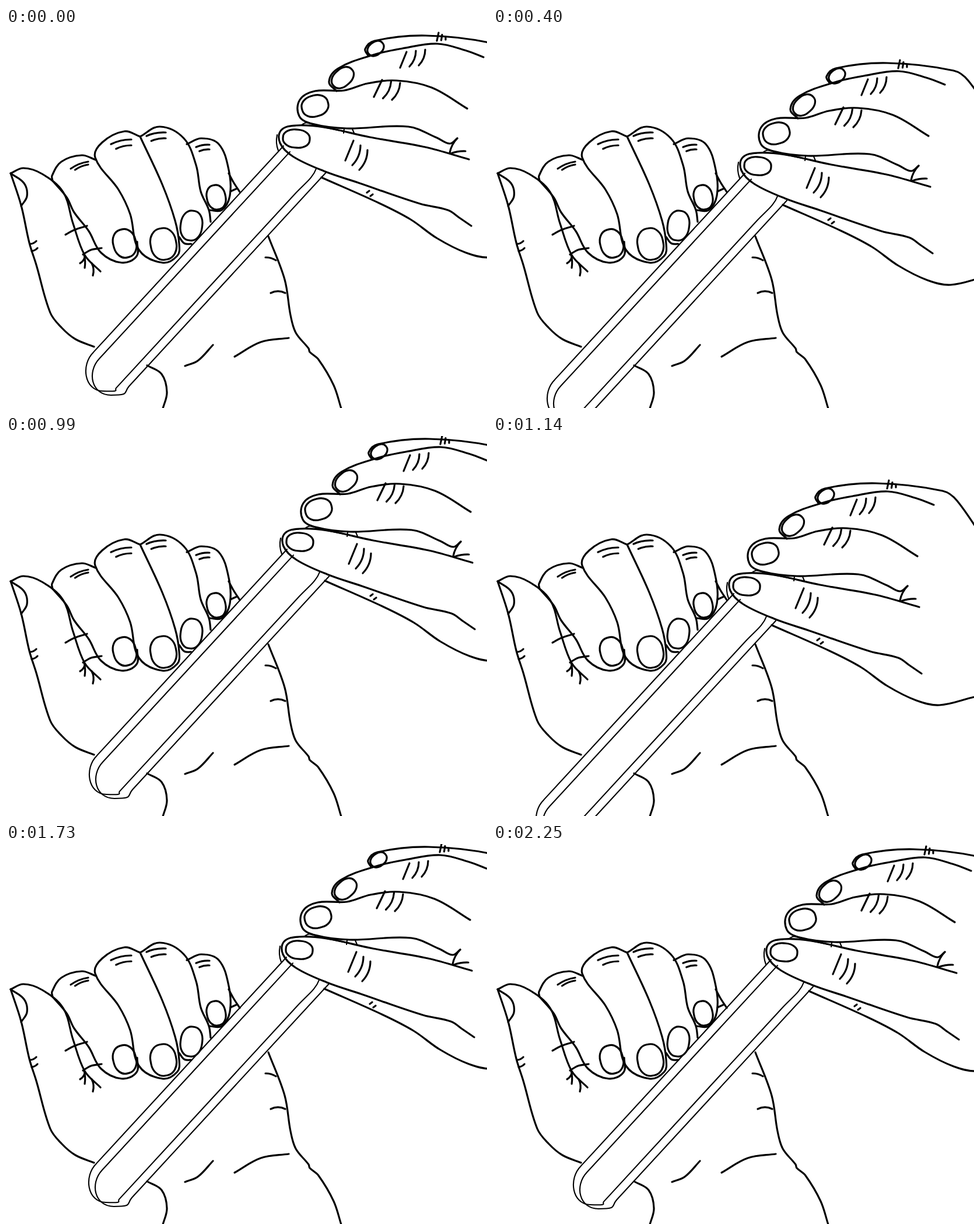
An HTML page for the animation above (2.58 s loop, 825 by 651 pixels).

```html
<!DOCTYPE html>
<html lang="en">
<head>
<meta charset="utf-8">
<title>Filing nails</title>
<style>
  html, body { margin: 0; width: 100%; height: 100%; overflow: hidden; background: #fff; }
  svg { display: block; width: 825px; height: 651px; }
  g { fill: none; stroke: #000; stroke-width: 3.2; stroke-linecap: round; stroke-linejoin: round; }
  #file { stroke-width: 2.1; }
</style>
</head>
<body>
<svg viewBox="0 0 825 651">
  <g id="resting"></g>
  <g id="moving"><g id="file"></g><g id="filing"></g></g>
</svg>
<script>
function pen(id) {
  const group = document.getElementById(id);
  const add = (tag, attributes) => {
    const shape = document.createElementNS(group.namespaceURI, tag);
    for (const name in attributes) shape.setAttribute(name, attributes[name]);
    group.append(shape);
  };
  const path = d => add("path", { d });

  // A bowed stroke from x, y that runs by dx, dy.
  const arc = (x, y, dx, dy, bow = 0) =>
    path(`M${x} ${y}q${dx / 2 + bow * dy} ${dy / 2 - bow * dx} ${dx} ${dy}`);

  // A nail is a rounded box around its centre.
  const nail = (x, y, rx, ry, tilt) => add("rect", {
    x: x - rx, y: y - ry, width: 2 * rx, height: 2 * ry,
    rx: rx * 0.9, ry: ry * 0.9, transform: `rotate(${tilt} ${x} ${y})`
  });

  // A smooth line: each point's tangent is parallel to its neighbours' chord.
  const curve = text => {
    const points = text.split(" ").map(p => p.split(",").map(Number));
    const handle = (i, length) => {
      const [x, y] = points[i];
      const [ax, ay] = points[i - 1] || points[i];
      const [bx, by] = points[i + 1] || points[i];
      const scale = length / Math.hypot(bx - ax, by - ay);
      return `${x + (bx - ax) * scale} ${y + (by - ay) * scale} `;
    };
    let d = "M" + points[0];
    for (let i = 1; i < points.length; i++) {
      const [[ax, ay], [bx, by]] = [points[i - 1], points[i]];
      const length = Math.hypot(bx - ax, by - ay) * 0.35;
      d += "C" + handle(i - 1, length) + handle(i, -length) + points[i];
    }
    path(d);
  };

  // A long wrinkle with a shorter one below it, both ending on the right.
  const knuckle = (x, y, dx, dy, gap) => {
    arc(x, y, dx, dy, 0.12);
    arc(x + dx / 4, y + dy / 4 + gap, dx * 0.75, dy * 0.75, 0.12);
  };

  // Three slanting wrinkles side by side.
  const folds = (x, y, stepX, stepY, dx, dy) => {
    for (let i = 0; i < 3; i++) arc(x + i * stepX, y + i * stepY, dx, dy, i ? 0.2 : 0);
  };

  return { path, arc, nail, curve, knuckle, folds };
}

function drawRestingHand({ curve, arc, nail, knuckle }) {
  // Thumb
  curve("8,249 26,304 40,368 52,406 76,488 96,514 119,533 151,546");
  curve("8,249 30,240 62,250 98,281 115,335 135,389 162,417");
  curve("8,249 31,266 36,288 26,305");
  arc(41, 370, 11, -5, -0.2);
  arc(44, 382, 10, -5, -0.2);

  // Index finger and the folds beneath it
  curve("80,262 79,253 95,229 130,218 154,226");
  curve("80,262 104,290 117,316 142,348 163,385 198,402 224,391 225,366");
  nail(203.5, 369, 19.5, 24.5, -15);
  knuckle(111, 241, 30, -12, 5);
  curve("102,354 117,346 139,339");
  curve("132,388 146,380 164,377");
  arc(134, 388, 1, 23, 0.1);
  arc(135, 393, -8, 10, 0.2);
  arc(147, 403, 2, 21, 0.2);

  // Middle finger
  curve("230,186 203,177 165,196 153,222 193,277 213,319 228,380 268,402 294,390 297,370 290,330 268,268 230,186");
  nail(270, 370, 22, 27, -10);
  knuckle(180, 199, 35, -8, 10);

  // Ring finger
  curve("230,186 264,169 305,189 326,235 334,280 348,312 351,332");
  curve("297,358 306,369 318,370");
  nail(318, 338.5, 18.5, 25.5, 8);
  knuckle(241, 185, 33, -6, 10);

  // Little finger
  curve("310,199 335,189 365,199 382,243 384,287 370,312 349,312");
  curve("382,249 390,264 401,281");
  arc(385, 280, 11, -5);
  nail(360.5, 290, 16, 21, -12);
  knuckle(326, 204, 23, -4, 8);

  // Palm and wrist
  curve("450,357 478,431 488,492 497,522 519,549 521,555 536,568 562,612 575,652");
  curve("242,578 267,593 276,624 269,652");
  curve("392,563 437,538 485,531");
  curve("307,579 329,570 355,543");
  arc(445, 393, 18, 5, 0.15);
  arc(454, 454, 25, 0, 0.25);
}

function drawFilingHand({ curve, arc, nail, folds }) {
  // Thumb
  curve("798,339 779,326 758,312 710,301 604,265 545,245 492,220 470,197 472,175 497,167 545,170 624,187 719,204 794,225");
  nail(498, 189.5, 23, 15.5, 5);
  folds(596, 193, 12, 8, -14, 34);

  // Index finger and the web beside it
  curve("791,138 730,102 670,90 620,95 580,107 530,108 504,123 503,151 525,164 584,172 690,169 739,188 761,198 774,189");
  nail(530, 133.5, 23, 18, -15);
  folds(645, 89, 15.5, 2.5, -14, 29);
  arc(774, 189, -13, 25, -0.15);
  arc(763, 215, 25, -4, 0.1);

  // Middle finger
  curve("567,108 554,92 570,69 630,46 680,35 740,27 790,39 819,50");
  nail(577.5, 85, 21, 14.5, -42);
  folds(687, 41, 16, -2, -11, 27);

  // Little finger
  curve("621,47 616,36 632,22 720,13 834,26 859,43 915,125");
  nail(634, 35, 15, 11, -38);
  for (let i = 0; i < 3; i++) arc(742 + 6 * i, 8 + 3.5 * i, 1.5 * i - 3, 14 - 4.5 * i);

  // Palm
  curve("541,256 640,300 694,328 739,360 789,385 829,393 889,379 914,375");
  for (const [x, y] of [[619, 282], [625, 288]]) arc(x, y, 4, -3);
}

function drawFile({ path, curve, arc }) {
  // All four edges are parallel; each is set by its height at x = 0.
  const edge = (height, x) => `${x} ${height - 1.084 * x} `;
  path(`M${edge(718, 476)}L${edge(718, 150)}C128 577 134 621 166 622S185 621 ${edge(821.5, 189)}`
    + `L${edge(821.5, 494)}C510 268 526 258 532 241`);
  path(`M${edge(740, 487)}L${edge(740, 160)}C138 590 147 629 180 629S201 625 ${edge(842.5, 211)}`
    + `L${edge(842.5, 548)}`);

  // Fingertips holding it from behind
  arc(465, 183, 2, 27, -0.15);
  arc(507, 166, 13, -4, 0.2);
  curve("515,162 545,170 580,177");
  arc(580, 173, -1, 7);
  arc(594, 173, 3, 7);
}

drawRestingHand(pen("resting"));
drawFile(pen("file"));
drawFilingHand(pen("filing"));

// Start time in ms, then the offset of the hand and file.
const poses = [
  [0, 0, 0],
  [400, -44, 47],
  [770, 6, -8],
  [1140, -63, 68],
  [1510, 5, -8],
  [1880, -89, 103],
  [2250, 1, -4],
  [2580, 1, -4]
];
const loop = 2580;

document.getElementById("moving").animate(
  poses.map(([time, x, y]) => ({
    offset: time / loop,
    transform: `translate(${x}px, ${y}px)`,
    easing: "steps(1, end)"
  })),
  { duration: loop, iterations: Infinity }
);
</script>
</body>
</html>
```
